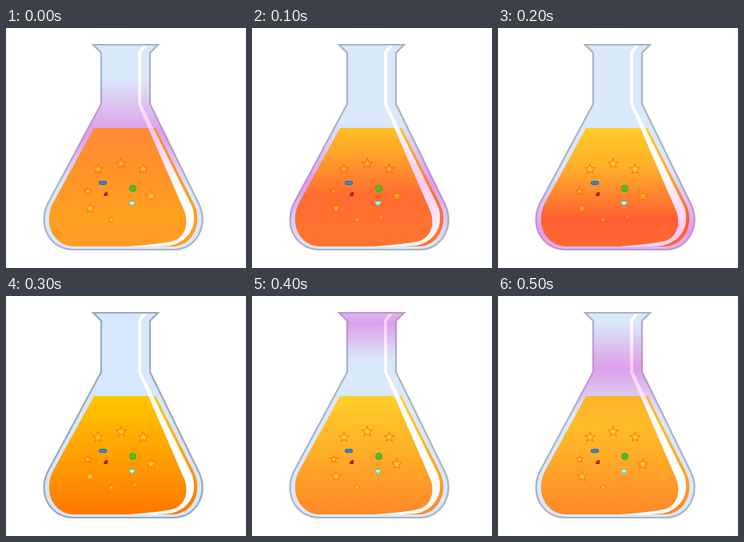
These frames come from a looping animation (300x300 px, 0.6 s). An HTML page with a canvas:

```html
<!DOCTYPE html>
<html lang="en">
<head>
<meta charset="utf-8">
<title>Flask</title>
<style>
html, body { margin: 0; width: 100%; height: 100%; overflow: hidden; background: #fff; }
canvas { display: block; width: 300px; height: 300px; }
</style>
</head>
<body>
<canvas id="stage" width="300" height="300"></canvas>
<script>
const ctx = document.getElementById('stage').getContext('2d');
const STEP = 100;

const flask = new Path2D('M109 21H190L180 31V95L241 220C254 246 238 277 210 277H84C56 277 39 248 52 220L119 95V31Z');
const liquid = new Path2D('M110 125H187L235 220C247 246 232 273 208 273H85C61 273 46 247 58 220Z');
const shine = new Path2D('M171 22H176L169 31V95L232 222C240 242 233 266 205 272Q180 274 153 273Q195 270 210 266C226 260 228 242 223 229L165 95V30Z');

// Glow centre and half height, then liquid colours as [y, colour]
const steps = [
  { y: 130, h: 68, liquid: [[125, '#ff8a38'], [180, '#ff9328'], [235, '#ffa020'], [273, '#ff9c26']] },
  { y: 195, h: 78, liquid: [[125, '#ffc024'], [165, '#ff9a2c'], [210, '#ff6c30'], [273, '#ff7630']] },
  { y: 253, h: 78, liquid: [[125, '#ffcc28'], [175, '#ffae2a'], [240, '#ff5e32'], [273, '#ff6832']] },
  { y: 0, h: 0, liquid: [[125, '#ffc800'], [273, '#ff7800']] },
  { y: 34, h: 46, liquid: [[125, '#ffd028'], [273, '#ff8828']] },
  { y: 90, h: 58, liquid: [[125, '#ffb428'], [165, '#ffbc28'], [273, '#ff8828']] }
];

// x, y, radius
const stars = [
  [115, 176.5, 6.5], [144, 169.5, 6.7], [171.5, 176.5, 6.5], [102, 204, 4.8],
  [181, 210, 6.7], [105, 225.5, 6.5], [131.5, 239.5, 3.6], [161.5, 236, 2.6]
];

function ramp(top, bottom, stops) {
  const g = ctx.createLinearGradient(0, top, 0, bottom);
  for (const [y, color] of stops) g.addColorStop((y - top) / (bottom - top), color);
  return g;
}

function glow(s, rgb, peak) {
  const top = s.y - s.h, bottom = s.y + s.h;
  const tint = a => `rgba(${rgb},${a * peak})`;
  return ramp(top, bottom, [
    [top, tint(0)], [s.y - s.h * .5, tint(.5)], [s.y, tint(1)],
    [s.y + s.h * .5, tint(.5)], [bottom, tint(0)]
  ]);
}

function paint(path, fill, stroke, width = 1) {
  ctx.fillStyle = fill;
  ctx.fill(path);
  if (!stroke) return;
  ctx.strokeStyle = stroke;
  ctx.lineWidth = width;
  ctx.stroke(path);
}

function starPath(x, y, r) {
  const p = new Path2D();
  for (let i = 0; i < 10; i++) {
    const a = i * Math.PI / 5 - Math.PI / 2;
    const d = i % 2 ? r * .42 : r;
    p.lineTo(x + d * Math.cos(a), y + d * Math.sin(a));
  }
  p.closePath();
  return p;
}

function drawItems(s) {
  for (const [x, y, r] of stars) {
    const near = s.h ? Math.max(0, 1 - Math.abs(y - s.y) / s.h) : 0;
    const g = Math.round(208 - 55 * near);
    const edge = Math.round(122 - 25 * near);
    paint(starPath(x, y, r), `rgb(255,${g},40)`, `rgb(255,${edge},25)`, r < 4 ? .8 : 1.1);
  }
  const pill = new Path2D();
  pill.roundRect(116.5, 191.8, 9, 3.6, 1);
  paint(pill, '#2a90ee', '#245c98');
  paint(new Path2D('M122.5 209.5Q122.5 205.5 126.5 205.5V209.5Z'), '#c82818', '#7c2414');
  const ball = new Path2D();
  ball.arc(158.5, 200.5, 3.9, 0, 7);
  paint(ball, '#56cc2c', '#3c9420');
  ctx.strokeStyle = '#3c9420';
  ctx.lineWidth = .7;
  ctx.stroke(new Path2D('M156.5 198.5L160.5 202.5M160.5 198.5L156.5 202.5'));
  paint(new Path2D('M155 216.5H160L161.5 218.5L157.5 222.2L153.5 218.5Z'), '#a8fff0', '#5cae9e', .8);
}

function draw(s) {
  ctx.globalCompositeOperation = 'source-over';
  ctx.clearRect(0, 0, 300, 300);
  ctx.lineJoin = 'miter';
  paint(flask, s.h ? '#dae9fa' : '#d6e8ff', s.h ? '#a9b4c4' : '#9aa9bc', 2.2);
  if (s.h) {
    ctx.globalCompositeOperation = 'source-atop';
    ctx.fillStyle = glow(s, '222,110,222', .6);
    ctx.fillRect(0, 0, 300, 300);
    ctx.globalCompositeOperation = 'source-over';
  }
  paint(liquid, ramp(125, 273, s.liquid));
  drawItems(s);
  paint(shine, '#fff');
  if (s.h) paint(shine, glow(s, '250,170,232', .65));
}

let shown = -1;
function tick(now) {
  const i = Math.floor(now / STEP) % steps.length;
  if (i !== shown) draw(steps[shown = i]);
  requestAnimationFrame(tick);
}
const start = performance.now();
const loop = () => {
  const i = Math.floor((performance.now() - start) / STEP) % steps.length;
  if (i !== shown) draw(steps[shown = i]);
  requestAnimationFrame(loop);
};
loop();
</script>
</body>
</html>
```
